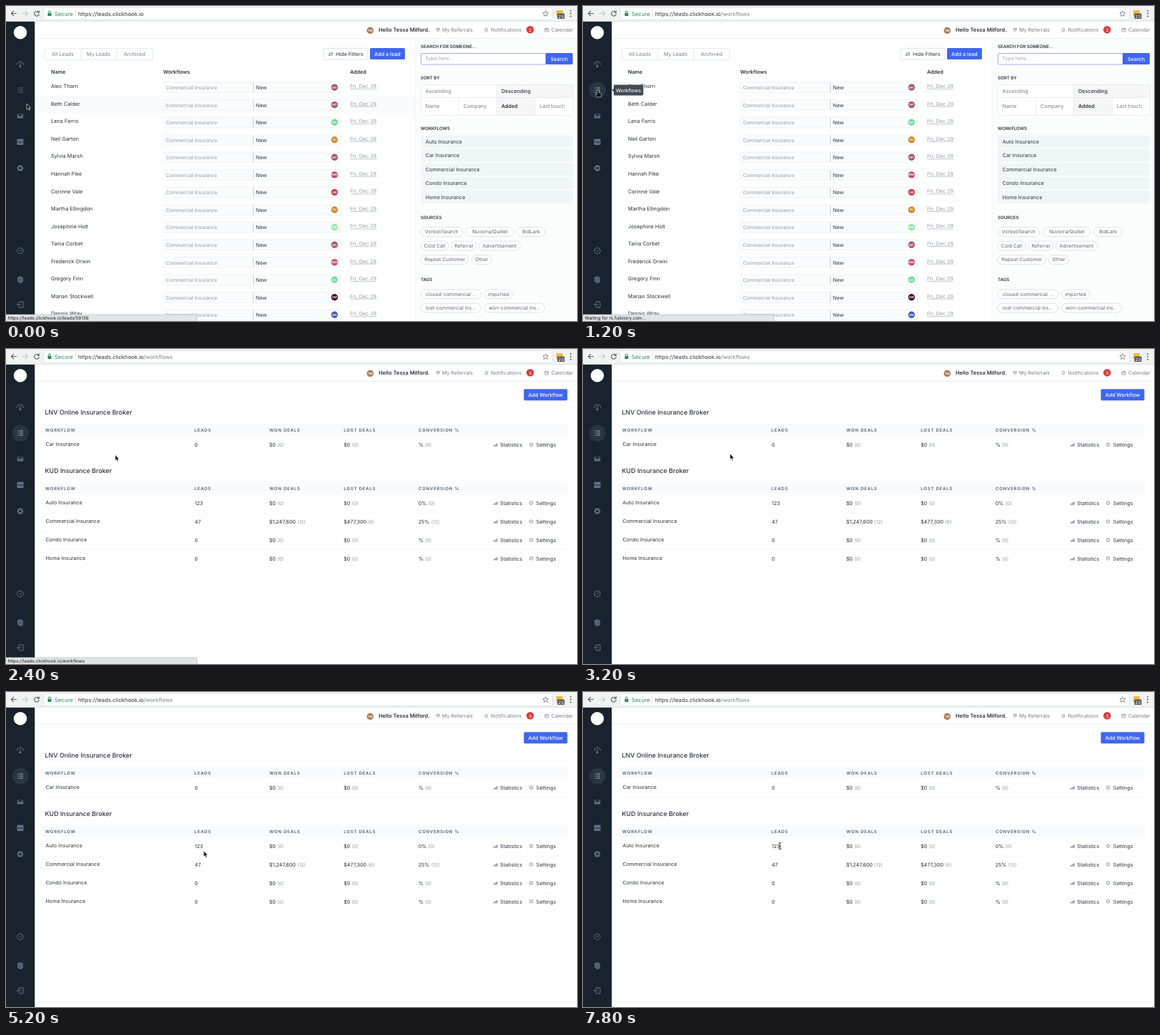
An HTML page for the animation above (8 s loop, 800 px wide and 442 px high).

```html
<!DOCTYPE html>
<html lang="en">
<head>
<meta charset="utf-8">
<title>Leads and workflows</title>
<style>
html, body { margin: 0; width: 100%; height: 100%; overflow: hidden; background: #fefefe; }
svg { display: block; width: 100vw; height: 100vh; }
text { font-family: Inter, "Open Sans", sans-serif; font-size: 7.2px; fill: #2b333d; white-space: pre; text-rendering: geometricPrecision; }
.b { font-weight: 600; }
.m { font-weight: 500; }
.g { fill: #75808c; }
.w { fill: #fff; font-weight: 500; }
.c { text-anchor: middle; }
.name { font-size: 7.35px; }
.flow { font-size: 6.8px; fill: #8d98a4; }
.date { fill: #959ea7; }
.hint { fill: #a2aab3; }
.tip { font-size: 6.8px; }
.num { font-size: 6px; }
.user { font-size: 7.5px; font-weight: 600; }
.cap { font-size: 6.15px; font-weight: 600; }
.th { font-size: 6px; font-weight: 600; letter-spacing: .8px; fill: #525e6b; }
.url { font-size: 7.75px; }
.st { font-size: 6.3px; fill: #111; }
.h { font-size: 8.9px; font-weight: 500; }
.av { font-size: 4.2px; font-weight: 600; fill: #fff; text-anchor: middle; }
.pill { font-size: 6.95px; fill: #5b6672; text-anchor: middle; }
.ic { fill: none; stroke: #62718a; stroke-width: 1; stroke-linejoin: round; }
#pointer { animation: move 8s infinite; }
@keyframes move {
  0% { transform: translate(29px, 137px); animation-timing-function: steps(2); }
  5% { transform: translate(21px, 118px); animation-timing-function: step-end; }
  22.5% { transform: translate(21px, 118px); animation-timing-function: steps(3); }
  30% { transform: translate(153px, 148.5px); animation-timing-function: steps(4); }
  40% { transform: translate(206px, 147px); animation-timing-function: step-end; }
  42.5% { transform: translate(206px, 147px); animation-timing-function: steps(4); }
  52.5% { transform: translate(278px, 119.5px); animation-timing-function: steps(2); }
  57.5% { transform: translate(278px, 123px); animation-timing-function: steps(3); }
  65% { transform: translate(277px, 223px); animation-timing-function: steps(3); }
  72.5%, 100% { transform: translate(276px, 216px); animation-timing-function: step-end; }
}
</style>
</head>
<body>
<svg id="stage" viewBox="0 0 800 442" preserveAspectRatio="none"></svg>
<script>
const LOOP = 8000, BLUE = '#4067ec', EDGE = '#e3e6ea';
let css = '', count = 0;

const text = (x, y, s, cls = '') => `<text x="${x}" y="${y}" class="${cls}">${s}</text>`;
const rect = (x, y, w, h, fill, stroke = 'none', r = 0) =>
  `<rect x="${x}" y="${y}" width="${w}" height="${h}" fill="${fill}" stroke="${stroke}" stroke-width=".7" rx="${r}"/>`;
const circle = (x, y, r, fill) => `<circle cx="${x}" cy="${y}" r="${r}" fill="${fill}"/>`;
const line = (x1, y1, x2, y2, color, w = .7) =>
  `<path d="M${x1} ${y1}L${x2} ${y2}" stroke="${color}" stroke-width="${w}" fill="none"/>`;
const icon = (x, y, d, style = '') => `<path class="ic" transform="translate(${x} ${y})" d="${d}" style="${style}"/>`;
const ring = r => `M${-r} 0a${r} ${r} 0 1 1 ${2 * r} 0a${r} ${r} 0 1 1 ${-2 * r} 0`;

// Shows its content only inside the given [from, to] spans in ms.
function timed(spans, body) {
  const name = 'on' + count++;
  const steps = spans.map(([a, b]) =>
    `${a / LOOP * 100}%{opacity:1}${b / LOOP * 100}%{opacity:0}`).join('');
  css += `@keyframes ${name}{0%{opacity:0}${steps}}`;
  return `<g style="animation:${name} ${LOOP}ms step-end infinite">${body}</g>`;
}

function browserBar() {
  const dark = 'stroke:#5a5d60;stroke-width:1.1';
  const url = path => `<text x="101" y="13.5" class="url">https://leads.clickhook.io<tspan fill="#7b7f83">${path}</tspan></text>`;
  return rect(0, 0, 800, 21.5, '#f1f2f2') + rect(52.5, 2.5, 713, 16.5, '#fff', '#dfe0e1', 2) +
    line(0, 21.2, 800, 21.2, '#d5d7d9') +
    icon(11, 10.5, 'M4 0H-3.5M0-3.6L-3.6 0L0 3.6', dark) +
    icon(27, 10.5, 'M-4 0H3.5M0-3.6L3.6 0L0 3.6', 'stroke:#c3c5c7;stroke-width:1.1') +
    icon(43, 10.5, 'M2.7-2A3.4 3.4 0 1 0 3.4 .6M3.4-4V-1.4H.6', dark) +
    rect(58.5, 10, 5, 4, '#2d8a4e', 'none', .5) +
    icon(61, 10, 'M-1.6 0V-1.5a1.6 1.6 0 0 1 3.2 0V0', 'stroke:#2d8a4e') +
    '<text x="68" y="13.5" class="url" style="fill:#2d8a4e">Secure</text>' +
    line(97.5, 5, 97.5, 16, '#d9dbdc') +
    timed([[0, 800]], url('')) + timed([[800, LOOP]], url('/workflows')) +
    icon(756, 10.7, 'M0-4L1.2-1.3L4-1.1L1.8 .8L2.5 3.6L0 2L-2.5 3.6L-1.8 .8L-4-1.1L-1.2-1.3Z', 'stroke:#707376;stroke-width:.8') +
    rect(771, 6, 9, 8, '#f0b93a', 'none', 1) + rect(772.5, 10.5, 10, 7.5, '#50555a', 'none', 1) +
    text(777.5, 16.6, '23', 'w c num') +
    [6.8, 10.6, 14.4].map(y => circle(791.2, y, 1, '#5a5d60')).join('');
}

function sidebar() {
  const bars = [-3, 0, 3].map(y => `M-3.5 ${y}h1.4M-1 ${y}H4`).join('');
  let teeth = '';
  for (let i = 0; i < 8; i++) {
    const a = i * Math.PI / 4, c = Math.cos(a), s = Math.sin(a);
    teeth += `M${2.8 * c} ${2.8 * s}L${4.6 * c} ${4.6 * s}`;
  }
  return rect(0, 21.5, 40.3, 421, '#18232e') + circle(20, 37.3, 9.2, '#fff') +
    icon(20, 81.5, 'M-4.5 1A4.5 4.5 0 0 1 4.5 1M0-1.5V4.2M-1.5 2.7L0 4.3L1.5 2.7', 'stroke-width:1.2') +
    timed([[0, 400]], icon(20, 118, bars)) +
    timed([[400, LOOP]], circle(20.3, 118, 11.6, '#293542') + icon(20, 118, bars, 'stroke:#aab4c3')) +
    icon(20, 154.5, 'M-4-2.8H4V2.8H-4ZM-4-2.4L0 .6L4-2.4', 'fill:#62718a;stroke:#465267;stroke-width:.9') +
    rect(15.5, 186.5, 9, 8.5, '#62718a', 'none', .7) +
    icon(20, 191, 'M-3.8 .5L-1.7-1.2L.3 1.3L2 -.6L3.8 .7', 'stroke:#18232e') +
    icon(20, 227.5, ring(2.6) + teeth, 'stroke-width:1.7') +
    icon(20, 343.5, ring(4.2) + 'M0 .7L1.6-2M0 .7L-1.2-.4') +
    icon(20, 384, 'M-3.5-3L0-4.6L3.6-2.7V3L.4 4.7L-3.5 2.5ZM-3.5-3L.4-.9V4.7', 'fill:#4b5a70;stroke-width:.9') +
    icon(20, 419, 'M-1.5-2V-4H4V4H-1.5V2M1.5 0H-4.5M-2.5-2L-4.5 0L-2.5 2');
}

function header() {
  const badge = n => text(734.3, 35.6, n, 'w c num');
  const thin = 'stroke:#8993a0;stroke-width:.8';
  return rect(40.3, 21.5, 760, 24, '#fff') + line(40.3, 45.3, 800, 45.3, EDGE) +
    circle(510.3, 34.3, 4.8, '#a9815e') + text(510.3, 35.8, 'TM', 'av') +
    text(522, 36.3, 'Hello Tessa Milford.', 'user') +
    icon(605.3, 33.5, 'M-2-2H2V0L0 2.3L-2 0ZM-2-.5H2', thin) + text(611, 36.3, 'My Referrals', 'g') +
    icon(673, 33.5, 'M-1.7 1.5V-.6a1.6 1.6 0 0 1 3.3 0V1.5ZM-.5 2.5H.7', thin) + text(679.5, 36.3, 'Notifications', 'g') +
    circle(734.3, 33.3, 5.3, '#dc3b3f') + timed([[0, 600]], badge(2)) + timed([[600, LOOP]], badge(3)) +
    icon(757.5, 33.7, 'M-2.5-2H2.5V2.3H-2.5ZM-2.5-.7H2.5M-1.2-3V-2M1.2-3V-2', thin) + text(764, 36.3, 'Calendar', 'g');
}

const people = ['Alec Thorn', 'Beth Calder', 'Lena Farris', 'Neil Garton', 'Sylvia Marsh', 'Hannah Pike',
  'Corinne Vale', 'Martha Ellingdon', 'Josephine Holt', 'Tania Corbet', 'Frederick Orwin', 'Gregory Finn',
  'Marian Stockwell', 'Dennis Wray'];
const agents = 'MT MT DC SU MT MW JW SU MS MT MW DC AM WA'.split(' ');
const tint = { MT: '#a05a6b', DC: '#78dc9b', SU: '#cd8c2b', MW: '#cb4b68', JW: '#cf414b',
  MS: '#95e8a0', AM: '#420b31', WA: '#4359b2' };

function leadRow(name, i) {
  const y = i * 24.55, who = agents[i];
  return text(63, 115.2 + y, name, 'name') +
    rect(220.5, 107 + y, 248, 14.6, '#f9fcfd', '#eaeef2', 1.5) +
    text(224, 117 + y, 'Commercial Insurance', 'flow') +
    line(346.5, 107.5 + y, 346.5, 121.2 + y, '#a9b2bc', .6) + text(350, 117 + y, 'New') +
    circle(460.3, 114.1 + y, 4.7, tint[who]) + text(460.3, 115.6 + y, who, 'av') +
    text(482, 115 + y, 'Fri, Dec 29', 'date') +
    line(482, 116.6 + y, 519.5, 116.6 + y, '#a9b1b9') +
    line(54, 126 + y, 559, 126 + y, '#f7f8f9', .6);
}

function filters() {
  const pill = ([x, y, w, s]) => rect(x, y - 6.3, w, 12.6, '#fff', '#cfd5db', 6.3) + text(x + w / 2, y + 2.4, s, 'pill');
  const kinds = ['Auto', 'Car', 'Commercial', 'Condo', 'Home'];
  return rect(573, 45.7, 227, 397, '#fbfdfd') + line(573, 45.7, 573, 442, '#eceef1') +
    text(581, 58.7, 'SEARCH FOR SOMEONE...', 'cap') +
    rect(581.5, 66.5, 175, 15.5, '#fff', '#6d93f0', 1.5) +
    text(587, 76.3, 'Type here...', 'hint') +
    rect(756, 66, 38, 16, BLUE, 'none', 1.5) + text(775, 76.7, 'Search', 'w c') +
    text(581, 103, 'SORT BY', 'cap') +
    rect(581, 110.3, 213.5, 43, '#fff', EDGE) +
    rect(687.3, 110.3, 107.2, 18, '#f6f6f7', EDGE) + rect(687.3, 128.3, 54, 25, '#f6f6f7', EDGE) +
    line(581, 128.3, 794.5, 128.3, EDGE) + line(634.3, 128.3, 634.3, 153.3, EDGE) +
    text(587.5, 122, 'Ascending', 'g') + text(694, 122, 'Descending', 'm') +
    text(587.5, 143.3, 'Name', 'g') + text(641, 143.3, 'Company', 'g') +
    text(694, 143.3, 'Added', 'b') + text(747.5, 143.3, 'Last touch', 'g') +
    text(581, 174, 'WORKFLOWS', 'cap') +
    kinds.map((k, i) => rect(581, 181.3 + i * 19.45, 213.5, 17.7, '#f0f6f7', 'none', 1.5) +
      text(587.7, 192.8 + i * 19.45, k + ' Insurance')).join('') +
    text(581, 299, 'SOURCES', 'cap') +
    [[581, 317, 58.5, 'Vorbel/Search'], [644, 317, 67.5, 'Nuvorra/Quillet'], [716, 317, 39.5, 'BidLark'],
      [581, 336.4, 39, 'Cold Call'], [624, 336.4, 34.5, 'Referral'], [662.5, 336.4, 58, 'Advertisement'],
      [581, 356, 67.5, 'Repeat Customer'], [652.5, 356, 28, 'Other'],
      [581, 404.3, 85, 'closed-commercial ...'], [670.5, 404.3, 39, 'imported'],
      [581, 423.6, 84.5, 'lost-commercial ins...'], [670.5, 423.6, 84, 'won-commercial ins...']].map(pill).join('') +
    text(581, 386, 'TAGS', 'cap');
}

function leadsPage() {
  return rect(40.3, 45.7, 533, 397, '#fefefe') +
    rect(54.5, 59.3, 151, 16, '#fff', '#d9dee4', 1.5) +
    line(105, 59.3, 105, 75.3, '#d9dee4') + line(155, 59.3, 155, 75.3, '#d9dee4') +
    text(79.5, 70, 'All Leads', 'g c') + text(129.7, 70, 'My Leads', 'g c') + text(180, 70, 'Archived', 'g c') +
    rect(445, 59.3, 62, 16, '#fff', '#cdd4dc', 1.5) +
    icon(455, 67.5, 'M-3-1.2H3M1.4-2.5L3-1.2M3 1.2H-3M-1.4 2.5L-3 1.2', 'stroke:#4a5562;stroke-width:.8') +
    text(462, 70, 'Hide Filters') +
    rect(510, 59, 49, 16, BLUE, 'none', 1.7) + text(534.5, 70, 'Add a lead', 'w c') +
    text(63, 95, 'Name', 'b') + text(220.3, 95, 'Workflows', 'b') + text(482, 95, 'Added', 'b') +
    line(54, 101.5, 559, 101.5, '#f5f6f7', .6) +
    timed([[0, 200]], rect(40.3, 126, 532, 24.5, '#f9fcfd')) +
    people.map(leadRow).join('') + filters();
}

function dealTable(y, title, rows) {
  const cols = [55, 264, 369, 473.3, 578];
  const heads = ['WORKFLOW', 'LEADS', 'WON DEALS', 'LOST DEALS', 'CONVERSION %'];
  const cell = (x, y, value) => {
    const [main, note] = value.split(' ');
    return `<text x="${x}" y="${y}">${main}<tspan dx="2.3" style="font-size:6.7px" fill="#929ca7">(${note})</tspan></text>`;
  };
  return text(54.5, y, title, 'h') + rect(50, y + 13.2, 737, 16, '#f7fbfe') +
    heads.map((h, i) => text(cols[i], y + 23.5, h, 'th')).join('') +
    rows.map(([name, leads, ...deals], i) => {
      const base = y + 44.9 + i * 25.9;
      return text(55.5, base - 1, name + ' Insurance') + text(264.3, base, leads) +
        deals.map((d, k) => cell(cols[k + 2] - .3, base, d)).join('') +
        `<path d="M682.5 ${base - .3}v-1.3l6.5-3.7v5z" fill="#a4adb7"/>` + text(692.3, base, 'Statistics') +
        icon(735.8, base - 3, ring(2), 'stroke:#b3bbc4;stroke-width:1.6') + text(742.8, base, 'Settings') +
        line(50, base + 11.2, 787, base + 11.2, '#f3f5f6', .6);
    }).join('');
}

function workflowPage() {
  return rect(40.3, 45.7, 760, 397, '#fefefe') +
    rect(725.5, 56.2, 61, 16, BLUE, 'none', 1.7) + text(756, 67, 'Add Workflow', 'w c') +
    dealTable(92.2, 'LNV Online Insurance Broker', [['Car', 0, '$0 0', '$0 0', '% 0']]) +
    dealTable(174.2, 'KUD Insurance Broker', [
      ['Auto', 123, '$0 0', '$0 0', '0% 0'],
      ['Commercial', 47, '$1,247,600 12', '$477,300 6', '25% 12'],
      ['Condo', 0, '$0 0', '$0 0', '% 0'],
      ['Home', 0, '$0 0', '$0 0', '% 0']]);
}

function tooltip() {
  const fill = '#424a52';
  return `<path d="M40.5 118l3-2.6v5.2z" fill="${fill}"/>` + rect(43, 110.5, 41.5, 15, fill, 'none', 1.5) +
    text(63.7, 120.5, 'Workflows', 'w c tip');
}

function statusBar() {
  const site = 'https://leads.clickhook.io/';
  const note = s => text(2.5, 440.2, s, 'st');
  return timed([[0, 3200]], rect(-1, 433, 268.5, 10, '#e2e4e6', '#b9bdc1', 1)) +
    timed([[0, 400]], note(site + 'leads/50136')) +
    timed([[400, 800], [1400, 3200]], note(site + 'workflows')) +
    timed([[800, 1400]], note('Waiting for rs.fullstory.com...'));
}

function pointer() {
  const arrow = '<path d="M0 0V8.2L1.9 6.5L3.2 9.5L4.6 8.9L3.3 6H5.7Z" fill="#111" stroke="#fff" stroke-width=".6"/>';
  const hand = '<path d="M-1.3 1Q0-.8 1.3 1V3.6L4 4.4Q5 4.8 4.8 6L3.9 9.8H-1L-3.3 6.3Q-3.4 4.6 -1.3 5.8Z" fill="#0b0b0b" stroke="#fff" stroke-width=".5"/>';
  const beam = '<path d="M-1.8-4.6Q0-4.6 0-3.6Q0-4.6 1.8-4.6M0-3.6V3.6M-1.8 4.6Q0 4.6 0 3.6Q0 4.6 1.8 4.6M-1 1H1" fill="none" stroke="#222" stroke-width=".9"/>';
  return '<g id="pointer">' + timed([[0, 400], [2000, 5800]], arrow) +
    timed([[400, 2000]], hand) + timed([[5800, LOOP]], beam) + '</g>';
}

document.getElementById('stage').innerHTML =
  timed([[0, 1400]], leadsPage()) + timed([[1400, LOOP]], workflowPage()) +
  header() + sidebar() + browserBar() +
  timed([[400, 2000]], tooltip()) + statusBar() + pointer();
document.head.appendChild(document.createElement('style')).textContent = css;
</script>
</body>
</html>
```
